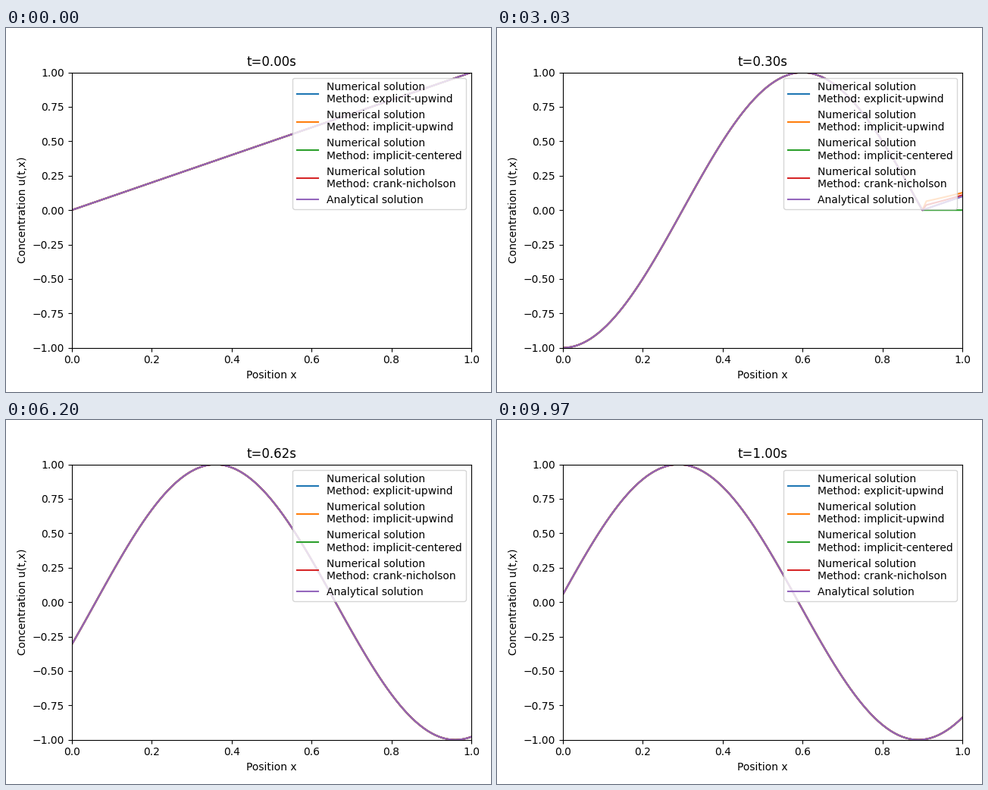
Recreate the animation shown at these times as a matplotlib script. Size 640 by 480 pixels, loop 10000 ms.

```python
import numpy as np
import matplotlib.pyplot as plt
from matplotlib.animation import FuncAnimation

SPEED = 3.0
FRAMES = 300
CELLS = 100
LOOP_MS = 10000

x = np.linspace(0, 1, CELLS + 1)


def inflow(t):
    return np.sin(5 * np.pi * t)


def exact(t):
    return np.where(x <= SPEED * t + 1e-9,
                    inflow(t - x / SPEED), x - SPEED * t)


def upwind(theta):
    """Theta scheme at Courant number 1; the swept part follows the inflow."""
    u = x.copy()
    history = [u]
    for n in range(1, FRAMES):
        t = n / FRAMES
        new = np.empty_like(u)
        new[0] = inflow(t)
        for j in range(1, CELLS + 1):
            known = theta * u[j] + (1 - theta) * u[j - 1]
            new[j] = (known + theta * new[j - 1]) / (1 + theta)
        swept = x <= SPEED * t + 1e-9
        new[swept] = exact(t)[swept]
        history.append(new)
        u = new
    return history


def centered():
    """Stays at zero ahead of the front after the first step."""
    history = [x.copy()]
    for n in range(1, FRAMES):
        t = n / FRAMES
        history.append(np.where(x <= SPEED * t + 1e-9, exact(t), 0))
    return history


solutions = {
    "explicit-upwind": upwind(0),
    "implicit-upwind": upwind(1),
    "implicit-centered": centered(),
    "crank-nicholson": upwind(0.5),
}

fig, ax = plt.subplots(figsize=(6.4, 4.8), dpi=100)
ax.set_xlim(0, 1)
ax.set_ylim(-1, 1)
ax.set_xlabel("Position x")
ax.set_ylabel("Concentration u(t,x)")
title = ax.set_title("t=0.00s")

curves = []
for name, history in solutions.items():
    line, = ax.plot(x, history[0],
                    label=f"Numerical solution\nMethod: {name}")
    curves.append((line, history))
analytical, = ax.plot(x, exact(0), label="Analytical solution")
curves.append((analytical, [exact(n / FRAMES) for n in range(FRAMES)]))

ax.legend(loc="upper right")
fig.tight_layout()
fig.subplots_adjust(top=1 - 58.6 / 480)


def update(n):
    for line, history in curves:
        line.set_ydata(history[n])
    title.set_text(f"t={n / FRAMES:.2f}s")
    return [line for line, _ in curves] + [title]


anim = FuncAnimation(fig, update, frames=FRAMES, interval=LOOP_MS / FRAMES,
                     repeat=True, repeat_delay=0, blit=False)
plt.show()
```
